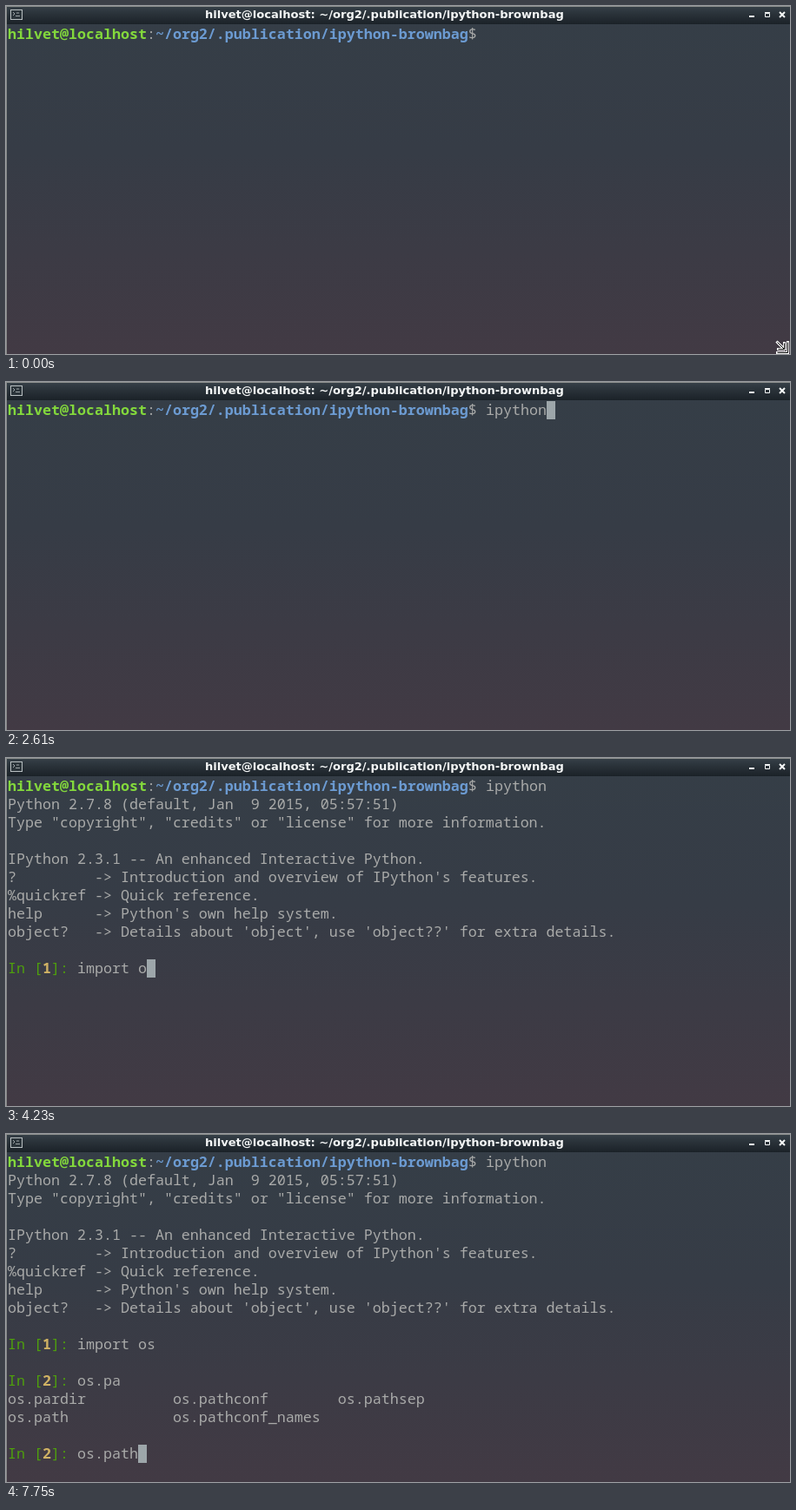
Write an HTML page that moves like this. It is 902x401 px and loops after 8000 ms.

```html
<!DOCTYPE html>
<html lang="en">
<head>
<meta charset="utf-8">
<title>Terminal session</title>
<style>
  html, body { margin: 0; width: 100%; height: 100%; overflow: hidden; background: #353d46; }
  svg { display: block; }
  text { white-space: pre; }
  #screen { font: 16.667px "Noto Sans Mono", monospace; fill: #a9aaa9; }
  .title { font: bold 13.05px "DejaVu Sans", sans-serif; fill: #f4f6f6; }
  .user { font-weight: bold; fill: #83d83c; }
  .path { font-weight: bold; fill: #6c9bd2; }
  .in { fill: #4e9f0c; }
  .num { font-weight: bold; fill: #d0b264; }
  .halo { fill: none; stroke: #fff; stroke-width: 3; stroke-linecap: square; }
  .core { fill: none; stroke: #000; stroke-width: 1; }
</style>
</head>
<body>
<svg width="902" height="401" viewBox="0 0 902 401">
  <defs>
    <linearGradient id="back" x2="0" y2="1">
      <stop offset="0" stop-color="#353e47"/>
      <stop offset=".42" stop-color="#363c46"/>
      <stop offset="1" stop-color="#423a44"/>
    </linearGradient>
    <linearGradient id="bar" x2="0" y2="1">
      <stop offset="0" stop-color="#374149"/>
      <stop offset=".5" stop-color="#283037"/>
      <stop offset="1" stop-color="#1b2228"/>
    </linearGradient>
    <path id="beam" d="M-3.5 -7.5h2l1.5 1.5l1.5 -1.5h2M0 -6v12M-3.5 7.5h2l1.5 -1.5l1.5 1.5h2"/>
    <path id="corner" d="M887.5 387.5l8 8M895.5 388.5v7h-7M899.5 387.5v12h-12"/>
  </defs>

  <rect width="902" height="401" fill="url(#back)"/>
  <rect width="902" height="21" fill="url(#bar)"/>
  <path d="M0 .5H902M.5 0V401" stroke="#8b8e8c"/>

  <g fill="none" stroke="#b9c0c2">
    <rect x="5.5" y="4.5" width="13" height="11" fill="#2b343a"/>
    <path d="M8 7l2 2l-2 2M11 11.5h5M12 8h3" stroke-width=".8"/>
  </g>
  <text class="title" x="229" y="14">hilvet@localhost: ~/org2/.publication/ipython-brownbag</text>
  <g fill="none" stroke="#f4f6f6">
    <path d="M855 12h6" stroke-width="2"/>
    <path d="M873.5 8.5h5v4h-5zM873 7.5h6"/>
    <path d="M890 7l6 6m0 -6l-6 6" stroke-width="2"/>
  </g>

  <g id="screen"></g>
  <rect id="caret" width="10" height="21" fill="#9da6aa"/>
  <g id="resize"><use href="#corner" class="halo"/><use href="#corner" class="core"/></g>
  <g id="pointer"><use href="#beam" class="halo"/><use href="#beam" class="core"/></g>
</svg>

<script>
const LOOP = 8000, CELL = 10, LINE = 21, LEFT = 2, TOP = 22;
const BLINK = 600, BLINK_LEAD = 40, KEY_LAG = 20;
const $ = id => document.getElementById(id);
const parts = [], moves = [], presses = [];
let row = 0, col = 0;

const press = at => presses.push(at);

function moveTo(at, r, c) {
  [row, col] = [r, c];
  moves.push({ at, row, col });
}

// Writes a line at the caret and leaves the caret behind it.
function print(at, html) {
  const el = document.createElementNS('http://www.w3.org/2000/svg', 'text');
  el.setAttribute('x', LEFT + col * CELL);
  el.setAttribute('y', TOP + row * LINE + 16);
  el.innerHTML = html;
  $('screen').append(el);
  parts.push({ at, el });
  moveTo(at, row, col + el.textContent.length);
}

function printLines(at, lines) {
  for (const line of lines) {
    moveTo(at, row + 1, 0);
    print(at, line);
  }
}

// Types a burst of keys, evenly spaced from the first to the last.
function type(text, from, to = from) {
  const gap = (to - from) / Math.max(1, text.length - 1);
  [...text].forEach((key, i) => {
    press(from + i * gap);
    print(from + i * gap, key);
  });
}

const prompt = n =>
  `<tspan class="in">In [<tspan class="num">${n}</tspan>]: </tspan>`;

print(0, '<tspan class="user">hilvet@localhost</tspan>:' +
  '<tspan class="path">~/org2/.publication/ipython-brownbag</tspan>$ ');
press(490);
type('i', 1990);
type('python', 2170, 2610);

press(2770);
moveTo(2770, 1, 0);
row = 0;
printLines(3100, [
  'Python 2.7.8 (default, Jan  9 2015, 05:57:51)',
  'Type "copyright", "credits" or "license" for more information.',
  '',
  'IPython 2.3.1 -- An enhanced Interactive Python.',
  "?         -&gt; Introduction and overview of IPython's features.",
  '%quickref -&gt; Quick reference.',
  "help      -&gt; Python's own help system.",
  "object?   -&gt; Details about 'object', use 'object??' for extra details.",
  '',
  prompt(1)
]);
type('imp', 3530, 3680);
type('or', 3850, 3920);
type('t o', 4080, 4230);
type('s', 4340);

press(4530);
printLines(4530, ['', prompt(2)]);
type('os', 5150, 5270);
type('.', 5460);
type('pa', 5970, 6060);

press(6650);
printLines(6670, [
  'os.pardir          os.pathconf        os.pathsep',
  'os.path            os.pathconf_names',
  '',
  prompt(2) + 'os.pa'
]);
type('th', 7630, 7750);

const show = (el, on) => { el.style.display = on ? '' : 'none'; };

function drawCaret(t) {
  const cell = moves.findLast(m => m.at <= t);
  const last = presses.findLast(at => at + KEY_LAG <= t);
  show($('caret'), (t - last + BLINK_LEAD) % (2 * BLINK) < BLINK);
  $('caret').setAttribute('x', LEFT + cell.col * CELL);
  $('caret').setAttribute('y', TOP + cell.row * LINE);
}

// The mouse leaves the corner in five steps and hides while typing.
function drawMouse(t) {
  show($('resize'), t < 460);
  show($('pointer'), t >= 460 && t < 2030);
  const step = Math.min(5, Math.floor((t - 460) / 40) + 1) / 5;
  const p = 1 - (1 - step) ** 2;
  $('pointer').setAttribute('transform',
    `translate(${Math.round(893 - 83 * p) + .5} ${Math.round(391 - 56 * p) + .5})`);
}

const start = performance.now();
function tick() {
  const t = (performance.now() - start) % LOOP;
  for (const { at, el } of parts) show(el, t >= at);
  drawCaret(t);
  drawMouse(t);
  requestAnimationFrame(tick);
}
tick();
</script>
</body>
</html>
```
